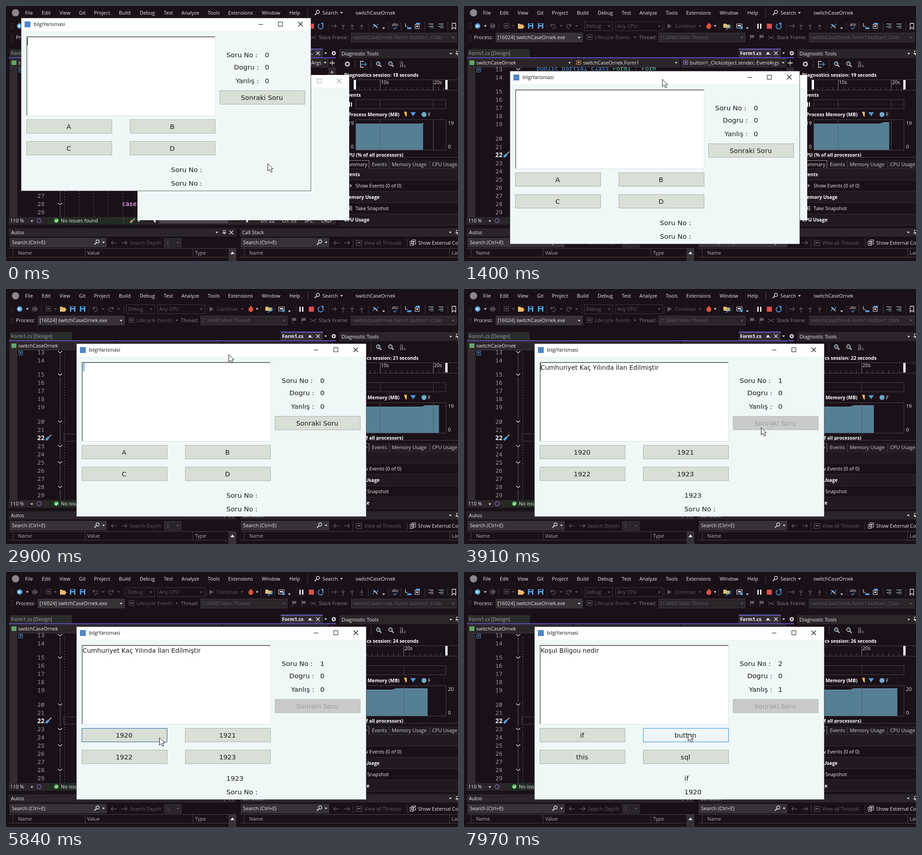
Recreate the animation shown at these times as an HTML page with a canvas. Size 997x562 px, loop 8 s.

```html
<!DOCTYPE html>
<html lang="tr">
<head>
<meta charset="utf-8">
<title>bilgiYarismasi</title>
<style>
html, body { margin: 0; width: 100%; height: 100%; overflow: hidden; background: #1a1018; }
canvas { display: block; }
</style>
</head>
<body>
<canvas id="stage" width="997" height="562"></canvas>
<script>
const c = document.getElementById('stage').getContext('2d');
const LOOP = 8000;
const UI = '"Open Sans", sans-serif', FORM = '"DejaVu Sans", sans-serif', MONO = '"Noto Sans Mono", monospace';
const BG = '#1a1018', BAR = '#2b252a', FIELD = '#383237', EDGE = '#4a444a';
const INK = '#eceaec', DIM = '#625b62', BLUE = '#4a9fe0', MINT = '#eff7f7';

// ---- drawing helpers ----
function rect(x, y, w, h, color) { c.fillStyle = color; c.fillRect(x, y, w, h); }
function box(x, y, w, h, color) {
  c.strokeStyle = color; c.lineWidth = 1;
  c.strokeRect(x + .5, y + .5, w - 1, h - 1);
}
function text(s, x, y, color = INK, size = 10.9, font = UI, weight = 400, align = 'left') {
  c.font = `${weight} ${size}px ${font}`;
  c.fillStyle = color; c.textAlign = align;
  c.fillText(s, x, y + size * .36);
}
const bold = (s, x, y) => text(s, x, y, '#fff', 10.5, UI, 700);
function line(color, width, ...p) {
  c.strokeStyle = color; c.lineWidth = width; c.beginPath();
  for (let i = 0; i < p.length; i += 2) c.lineTo(p[i], p[i + 1]);
  c.stroke();
}
function poly(color, ...p) {
  c.fillStyle = color; c.beginPath();
  for (let i = 0; i < p.length; i += 2) c.lineTo(p[i], p[i + 1]);
  c.fill();
}
function disc(x, y, r, color) { c.fillStyle = color; c.beginPath(); c.arc(x, y, r, 0, 7); c.fill(); }
function ring(x, y, r, color, from = 0, to = 6.3, width = 1.4) {
  c.strokeStyle = color; c.lineWidth = width; c.beginPath(); c.arc(x, y, r, from, to); c.stroke();
}
const drop = (x, y, color = INK) => poly(color, x - 3, y - 1.5, x + 3, y - 1.5, x, y + 2);
const cross = (x, y, r, color) => { line(color, 1.3, x - r, y - r, x + r, y + r); line(color, 1.3, x - r, y + r, x + r, y - r); };
const vline = (x, y0, y1, color = EDGE) => line(color, 1, x + .5, y0, x + .5, y1);
const hline = (y, x0, x1, color = EDGE) => line(color, 1, x0, y + .5, x1, y + .5);
function lens(x, y, dir = 1, color = INK) { ring(x + dir * 2, y - 2, 3.5, color); line(color, 1.8, x - dir, y + 1, x - dir * 5, y + 5); }
function arrow(x, y, dir, color = DIM) {
  line(color, 1.4, x - 6, y, x + 6, y);
  line(color, 1.4, x + dir * 2, y - 4, x + dir * 6, y, x + dir * 2, y + 4);
}
function gear(x, y, r) {
  ring(x, y, r, INK, 0, 6.3, 2);
  for (let a = 0; a < 6; a += Math.PI / 4)
    line(INK, 1.6, x + Math.cos(a) * r, y + Math.sin(a) * r, x + Math.cos(a) * (r + 2), y + Math.sin(a) * (r + 2));
}
function pin(x, y) { box(x - 2, y - 5, 5, 6, INK); hline(y + 1, x - 4, x + 5, INK); vline(x, y + 1, y + 5, INK); }
function grip(x, y) { for (let i = -6; i < 8; i += 4) { rect(x - 2, y + i, 1, 1, '#8a848a'); rect(x + 2, y + i, 1, 1, '#8a848a'); } }
function icon(x, y, color, w = 11, h = 11) { box(x - w / 2 | 0, y - h / 2 | 0, w, h, color); rect((x - w / 2 | 0) + 3, y - 2, w - 6, 3, color); }
function combo(x, y, w, h, s, color, fill = BAR) {
  rect(x, y, w, h, fill); box(x, y, w, h, '#403a40');
  text(s, x + 4, y + h / 2, color); drop(x + w - 8, y + h / 2, color);
}

// ---- timing helpers ----
// last value whose start time has passed
const at = (steps, t) => steps.reduce((v, [start, x]) => t >= start ? x : v, steps[0][1]);
const EDGES = [[0, 920], [330, 925], [700, 930], [1050, 938], [1600, 944], [2100, 949], [2500, 955], [3000, 961],
  [3450, 966], [3730, 904], [4290, 913], [4800, 919], [5300, 924], [5570, 930], [6100, 936], [6450, 942], [6950, 948], [7300, 956]];
const TICKS = [500, 1600, 2500, 3730, 4300, 5300, 6100, 7300];
const PATH = [[0, 577, 347], [60, 577, 347], [520, 369, 44], [600, 369, 44], [840, 416, 141], [900, 422, 150], [1080, 437, 161],
  [1880, 437, 161], [2070, 451, 154], [2480, 488, 140], [2760, 491, 144], [2930, 491, 144], [3480, 655, 305], [4650, 655, 305],
  [5000, 480, 418], [5440, 338, 365], [6430, 338, 365], [7100, 655, 300], [7380, 655, 300], [7900, 494, 356], [8000, 494, 356]];
const CARET_ON = [[0, 120], [600, 1240], [1700, 2230], [3000, 3530], [3730, 4290], [4820, 5350], [7350, 7880]];
const ASK1 = 3730, ANSWER = 5970, ASK2 = 7350;

function pointer(t) {
  const i = PATH.findIndex(p => p[0] > t), [t0, x0, y0] = PATH[i - 1], [t1, x1, y1] = PATH[i];
  let k = (t - t0) / (t1 - t0);
  if (t1 - t0 > 300) k = k * k * (3 - 2 * k);
  return [Math.round(x0 + (x1 - x0) * k), Math.round(y0 + (y1 - y0) * k)];
}

// ---- development environment ----
function toolbars() {
  disc(21, 15, 8, '#8c878d');
  const menu = { File: 42, Edit: 79, View: 118, Git: 161, Project: 194, Build: 249, Debug: 295, Test: 348,
    Analyze: 387, Tools: 445, Extensions: 490, Window: 564, Help: 625, Search: 698, switchCaseOrnek: 771 };
  for (const s in menu) text(s, menu[s], 15);
  vline(665, 5, 25); lens(686, 15); drop(740, 15);

  grip(13, 44); disc(30, 44, 6, BLUE); line('#fff', 1.4, 34, 44, 27, 44); line('#fff', 1.4, 30, 41, 27, 44, 30, 47); drop(47, 44);
  disc(63, 44, 6, '#403a40'); arrow(63, 44, 1);
  icon(94, 44, DIM); drop(109, 44, DIM);
  poly('#e8bd6a', 119, 39, 124, 39, 126, 41, 131, 41, 131, 44, 134, 44, 130, 50, 119, 50);
  for (const x of [147, 169]) { rect(x - 6, 38, 12, 12, BLUE); rect(x - 3, 39, 6, 3, BG); rect(x - 3, 45, 6, 5, BG); }
  for (const x of [77, 183, 260, 442, 562, 592, 640, 711, 799]) vline(x, 35, 54, '#352e35');
  for (const [x, d] of [[197, -1], [231, 1]]) {
    ring(x, 45, 4.5, DIM, d < 0 ? -2.8 : 1, d < 0 ? 2 : 6); line(DIM, 1.4, x + d * 5, 39, x + d * 5, 44, x + d, 44); drop(x + 17, 44, DIM);
  }
  combo(265, 34, 63, 21, 'Debug', DIM, BG); combo(334, 34, 105, 21, 'Any CPU', DIM, BG);
  poly(DIM, 449, 39, 458, 44, 449, 50); text('Continue', 465, 44, DIM); drop(521, 44, DIM);
  poly('#e2543c', 540, 37, 545, 42, 545, 48, 540, 51, 535, 48, 535, 43); drop(554, 44);
  poly('#e8bd6a', 572, 39, 578, 39, 580, 41, 586, 41, 586, 48, 572, 48); lens(583, 47, 1, BLUE);
  icon(608, 44, INK, 13, 10); disc(612, 48, 3, BLUE); drop(625, 49);
  rect(647, 39, 3, 11, INK); rect(653, 39, 3, 11, INK); rect(668, 39, 11, 11, '#e04f4f');
  ring(694, 45, 5.5, BLUE, -.8, 4.4, 1.8); poly(BLUE, 694, 37, 700, 37, 700, 43);
  arrow(723, 44, 1);
  for (const [x, d] of [[743, 1], [763, 1], [784, -1]]) { vline(x, 38, 47, DIM); line(DIM, 1.4, x - 3, 44 - d * 2, x + .5, 44 + d * 2, x + 4, 44 - d * 2); disc(x + .5, 50, 1.5, DIM); }
  line(BLUE, 1.4, 809, 49, 814, 41, 817, 46, 821, 39); line(INK, 1.2, 810, 40, 820, 49); drop(833, 49); grip(844, 44);
  text('abc', 851, 41, INK, 9); line(BLUE, 1.3, 854, 48, 857, 51, 862, 46);
  line(INK, 1.2, 881, 38, 881, 45, 886, 45); rect(885, 47, 9, 4, BLUE);
  icon(907, 45, INK, 10, 10); rect(904, 37, 9, 3, BLUE);
  for (const x of [937, 959]) for (let i = 0; i < 4; i++) hline(39 + i * 3, x - 5 + i % 2 * 4, x + 6, i % 2 ? '#5fb878' : INK);
  vline(871, 35, 54); vline(924, 35, 54); vline(974, 35, 54);
  line(INK, 1.3, 984, 38, 992, 38, 992, 51, 988, 47, 984, 51, 984, 38);

  grip(13, 69); text('Process:', 22, 69); combo(70, 59, 192, 21, '[16024] switchCaseOrnek.exe', INK, FIELD);
  icon(277, 69, DIM, 12); text('Lifecycle Events', 288, 69, DIM); drop(377, 69, DIM); text('Thread:', 386, 69, '#8a848a');
  combo(429, 59, 192, 21, '[12848] Main Thread', DIM, BAR);
  for (const x of [631, 652]) { vline(x, 63, 76, DIM); rect(x, 64, 9, 6, DIM); }
  line(DIM, 1.3, 671, 66, 684, 73); line(DIM, 1.3, 671, 73, 684, 66);
  text('Stack Frame:', 690, 69, '#8a848a'); combo(761, 59, 233, 21, 'switchCaseOrnek.Form1.button1_Click', DIM, BAR);
}

function editor() {
  rect(8, 95, 137, 18, '#2a2c2c'); text('Form1.cs [Design]', 11, 104, '#aaa6aa');
  rect(606, 95, 93, 18, '#332d38'); rect(606, 94, 93, 2, '#6f63d0'); bold('Form1.cs', 609, 104);
  rect(668, 102, 5, 4, INK); hline(106, 666, 677, INK); cross(688, 104, 4, INK); drop(705, 104); gear(723, 104, 3);
  rect(6, 113, 722, 2, '#6054b8');
  for (const [x, s, color] of [[8, 'switchCaseOrnek', '#5fa968'], [243, 'switchCaseOrnek.Form1', '#d9a35c'], [479, 'button1_Click(object sender, EventArgs', '#a98be0']]) {
    rect(x, 116, 232, 19, BAR); box(x, 116, 232, 19, '#403a40');
    if (x === 8) rect(12, 120, 11, 10, color); else { icon(x + 10, 125, color, 10, 9); }
    text(s, x === 8 ? 27 : x + 19.5, 125); rect(x + 219, 117, 12, 17, BAR); drop(x + 225, 125);
  }
  vline(719, 119, 132, INK); hline(124, 714, 725, INK); hline(126, 714, 725, INK);

  c.save(); c.beginPath(); c.rect(0, 135, 728, 330); c.clip();
  rect(8, 135, 17, 330, '#312b30'); rect(711, 135, 17, 330, '#312b30'); poly('#9a949a', 715, 148, 723, 148, 719, 142);
  icon(33, 141, BLUE, 9, 10);
  vline(119, 135, 465, '#69636a');
  c.setLineDash([3, 3]);
  for (let x = 129; x < 260; x += 32) vline(x, 143, 465, '#655f66');
  c.setLineDash([]);
  box(127, 319, 584, 17, '#48424a');
  let y = 139;
  for (let n = 13; n < 30; n++) {
    text(n, 85, y, n === 22 ? '#fff' : '#9d979d', 13.3, MONO, n === 22 ? 700 : 400, 'right');
    if ([13, 15, 20, 23, 25, 28].includes(n)) { rect(114, y - 5, 11, 10, BG); line(INK, 1.3, 115, y - 2, 119.5, y + 2, 124, y - 2); }
    if (n === 14 || n === 19) y += 13.5;
    y += 18;
  }
  text('public partial', 160, 137, BLUE, 13.3, MONO); text('class', 280, 137, BLUE, 13.3, MONO); text('Form1 : Form', 328, 137, '#4ec9b0', 13.3, MONO);
  text('case', 256, 436, '#c98add', 13.3, MONO, 700);
  line(BLUE, 5, 88, 333, 94, 327); line(INK, 1.5, 94, 327, 100, 321);
  c.restore();

  rect(6, 465, 722, 17, BAR); rect(92, 465, 200, 17, '#232b24');
  text('110 %', 9, 473.5); drop(57, 474); ring(73, 473, 4.5, '#7a70b8');
  disc(111, 473, 5, '#4fb862'); line('#fff', 1.3, 108.5, 473, 110.5, 475.5, 114, 471); text('No issues found', 121, 473.5);
  vline(259, 467, 480); line('#d99a62', 4, 274, 477, 279, 473); line(INK, 1.3, 279, 473, 284, 468); drop(293, 474);
  poly(INK, 330, 470, 330, 478, 325, 474); rect(338, 468, 152, 11, '#4c464c'); poly(INK, 530, 470, 530, 478, 535, 474);
  text('Ln: 22', 562, 473.5); text('Ch: 53', 609, 473.5); text('SPC', 658, 473.5); text('CRLF', 695, 473.5);
}

function panels() {
  for (const [x, w, title, searchW] of [[6, 502, 'Autos', 214], [516, 481, 'Call Stack', 195]]) {
    rect(x, 490, w, 18, BAR); text(title, x + 5, 499);
    rect(x + 2, 511, searchW, 21, FIELD); text('Search (Ctrl+E)', x + 7, 521.5);
    lens(x + searchW - 20, 521, 1); drop(x + searchW - 5, 521);
    arrow(x + searchW + 18, 522, -1); arrow(x + searchW + 41, 522, 1);
    rect(x, 534, w, 1, EDGE); rect(x, 553, w, 1, EDGE); vline(x + 9, 535, 553);
    text('Name', x + 20.5, 544, '#b5b0b5');
  }
  drop(465, 499); pin(481, 499); cross(497, 499, 4, INK); drop(980, 499); pin(995, 499);
  text('Search Depth:', 273, 522, DIM); combo(349, 512, 38, 20, '3', DIM);
  vline(174, 535, 553); vline(412, 535, 553); text('Value', 179, 544, '#b5b0b5'); text('Type', 417, 544, '#b5b0b5');
  rect(491, 535, 17, 27, FIELD); poly(INK, 495, 547, 504, 547, 499.5, 541);
  vline(765, 513, 531); icon(779, 522, DIM, 13, 12); text('View all Threads', 790, 522, DIM);
  vline(884, 513, 531); icon(895, 523, INK, 8, 10); icon(900, 520, INK, 9, 10); text('Show External Code', 909, 522);
  vline(978, 535, 553); text('Lan', 983, 544, '#b5b0b5');
}

function diagnostics(t) {
  const shift = t < 3730 ? 0 : 65, edge = at(EDGES, t), seconds = 18 + TICKS.filter(x => t >= x).length;
  rect(735, 95, 262, 20, BAR); text('Diagnostic Tools', 740, 105); drop(981, 105); pin(995, 104);
  gear(753, 128, 4); vline(770, 119, 138); vline(805, 119, 138);
  line(INK, 1.3, 789, 122, 782, 122, 782, 135, 789, 135); arrow(789, 128.5, 1, BLUE);
  for (const x of [821, 848]) { ring(x, 127, 4, INK); line(INK, 1.8, x + 3, 130, x + 7, 134); hline(126, x - 2, x + 3, BLUE); }
  vline(821, 125, 130, BLUE);
  rect(869, 129, 3, 6, DIM); rect(873, 125, 3, 10, DIM); rect(878, 130, 3, 5, DIM); ring(872, 125, 2.5, DIM);
  bold(`Diagnostics session: ${seconds} seconds`, 746, 152.5);

  hline(162, 735, 997); hline(185, 735, 997);
  for (let k = -6; k < 20; k++) {
    const x = Math.round(825 - shift + k * 11.7);
    if (x > 771 && x < 969) vline(x, k % 10 ? 179 : 163, 185, k % 10 ? '#59535a' : '#8a848a');
  }
  if (!shift) text('10s', 827, 168.5);
  text('20s', 944 - shift, 168.5);
  rect(767, 163, 5, 21, '#fff'); rect(969, 163, 5, 21, '#fff');
  bold('Events', 748, 196); rect(757, 212, 2, 10, INK); rect(761, 212, 2, 10, INK);
  box(771, 206, 200, 21, EDGE); hline(216, 772, 970, '#2c252c');
  bold('Process Memory (MB)', 755, 239);
  poly('#f0bd4c', 878, 233, 884, 233, 884, 244, 881, 242); poly(BLUE, 892, 234, 904, 234, 898, 243); disc(922, 239, 5.5, '#6fa9c8');
  c.save(); c.beginPath(); c.rect(930, 230, 6, 18); c.clip(); text('P', 931, 239); c.restore();
  const step = 917 - shift, top = x => x < step ? 260 : 257;
  poly('#557f94', 772, 317, 772, 260, Math.min(step, edge), 260, Math.min(step + 8, edge), top(edge), edge, top(edge), edge, 317);
  line('#7fb0c8', 1, 772, 260, Math.min(step, edge), 260, Math.min(step + 8, edge), top(edge), edge, top(edge));
  for (const x of [825, 942]) if (x - shift > 771) { vline(x - shift, 207, 226); vline(x - shift, 252, 317, '#55606a'); }
  box(771, 250, 200, 68, EDGE);
  const peak = t < 5570 ? '19' : '20';
  for (const [s, y] of [[peak, 258], ['0', 310]]) { text(s, 767, y, INK, 10.9, UI, 400, 'right'); text(s, 975, y); }
  c.save(); c.beginPath(); c.rect(735, 320, 262, 13); c.clip(); bold('CPU (% of all processors)', 748, 328); c.restore();

  rect(735, 333, 262, 1, EDGE); rect(735, 340, 262, 18, '#231b22');
  rect(738, 340, 62, 19, BG); box(738, 340, 63, 19, '#9a949a');
  text('Summary', 748, 349); text('Events', 807, 349, '#cfcacf'); text('Memory Usage', 851, 349, '#cfcacf'); text('CPU Usage', 940, 349, '#cfcacf');
  vline(845, 341, 358); vline(934, 341, 358); hline(358, 800, 997);
  for (const [s, y] of [['Events', 371], ['Memory Usage', 421], ['CPU Usage', 471]]) {
    rect(735, y - 12, 262, 24, '#211820'); bold(s, 746, y); hline(y + 12, 735, 997, '#352e35'); hline(y - 13, 735, 997, '#352e35');
  }
  text('Show Events (0 of 0)', 771, 396); line(INK, 1.3, 758, 393, 762, 396, 758, 399);
  text('Take Snapshot', 771, 446); icon(758, 446, INK, 11, 9);
}

// ---- quiz window ----
function windowButtons(x, y, color) {
  box(x - 49, y - 5, 10, 10, color);
  cross(x, y, 5, color);
}

function quiz(X, Y, t, [px, py], dragging) {
  const phase = t < ASK1 ? 0 : t < ASK2 ? 1 : 2;
  const options = [['A', 'B', 'C', 'D'], ['1920', '1921', '1922', '1923'], ['if', 'button', 'this', 'sql']][phase];
  const locked = phase === 2 || phase === 1 && t < ANSWER;
  const label = (s, x, y, align) => text(s, X + x, Y + y, '#1c1c1c', 14.9, FORM, 400, align);

  rect(X, Y, 640, 382, MINT); rect(X, Y, 640, 29, '#fff'); box(X, Y, 640, 382, '#5c5f60');
  rect(X + 8, Y + 8, 13, 13, '#4f86c6'); text('bilgiYarismasi', X + 28, Y + 14.5, '#111');
  hline(Y + 14, X + 524, X + 534, '#111'); windowButtons(X + 616.5, Y + 14, '#111');

  rect(X + 12, Y + 41, 417, 175, '#fff');
  rect(X + 12, Y + 41, 417, 2, '#6f7272'); rect(X + 12, Y + 41, 2, 175, '#7d8080'); rect(X + 12, Y + 215, 417, 1, '#dfe3e3'); rect(X + 428, Y + 41, 1, 175, '#dfe3e3');
  text(['', 'Cumhuriyet Kaç Yılında İlan Edilmiştir', 'Koşul Biligou nedir'][phase], X + 14, Y + 52.5, '#1c1c1c', 13.9, FORM);
  if (CARET_ON.some(([a, b]) => t >= a && t < b)) rect(X + 14, Y + 44, 1, 17, '#111');
  if (t >= 2900 && t < 3000) rect(X + 14, Y + 43, 5, 18, '#a6c9e6');

  function button(s, x, y, off, pressed, focused) {
    const bx = X + x, by = Y + y;
    const over = !off && !dragging && px >= bx && px < bx + 189 && py >= by && py < by + 31;
    rect(bx, by, 189, 31, off ? '#c9caca' : over && !pressed ? '#edf5f9' : '#d8dfd6');
    box(bx, by, 189, 31, off ? '#bcbebe' : pressed || focused ? '#1c66ad' : over ? '#2f8ad6' : '#aab0aa');
    text(s, bx + 93.5, by + 16, off ? '#9b9c9c' : '#1c1c1c', 14.6, FORM, 400, 'center');
  }
  options.forEach((s, i) => button(s, 12 + i % 2 * 228.5 | 0, 224 + (i >> 1) * 48, false,
    !i && t >= 5800 && t < ANSWER, !i && t >= ANSWER && t < ASK2));
  button('Sonraki Soru', 438, 160, locked, t > 3650 && t < ASK1);

  label('Soru No :', 453, 82); label(phase, 538, 82);
  label('Dogru :', 525, 109, 'right'); label('0', 538, 109);
  label('Yanlış :', 525, 139, 'right'); label(t < ANSWER ? 0 : 1, 538, 139);
  label(['Soru No :', '1923', 'if'][phase], 331, 335);
  label(t < ANSWER ? 'Soru No :' : '1920', 331, 365);
}

function backWindow() {
  rect(290, 152, 467, 320, MINT); rect(290, 152, 467, 28, '#fff');
  windowButtons(735, 165, '#a0a0a0');
}

function outline(x, y) {
  c.globalCompositeOperation = 'difference';
  c.strokeStyle = '#e8ece8'; c.lineWidth = 4;
  c.strokeRect(x + 2, y + 2, 636, 378);
  c.globalCompositeOperation = 'source-over';
}

function arrowCursor(x, y) {
  c.beginPath();
  [[0, 0], [0, 16], [4, 12.5], [6.5, 18.5], [9.5, 17.5], [7, 11.5], [11.5, 11.5]].forEach(([a, b]) => c.lineTo(x + a + .5, y + b + .5));
  c.closePath();
  c.fillStyle = '#fff'; c.fill();
  c.strokeStyle = '#111'; c.lineWidth = 1; c.stroke();
}

function draw(t) {
  const tip = pointer(t), first = t >= 600 && t < 1240, second = t >= 1880 && t < 2900;
  const [X, Y] = at([[0, [33, 26]], [1240, [101, 143]], [2900, [155, 120]]], t);
  rect(0, 0, 997, 562, BG);
  toolbars(); editor(); panels(); diagnostics(t);
  backWindow();
  quiz(X, Y, t, tip, first || second);
  const [gx, gy] = first ? [369, 44] : [437, 161];
  if ((first || second) && (tip[0] !== gx || tip[1] !== gy)) outline(X + tip[0] - gx, Y + tip[1] - gy);
  arrowCursor(...tip);
}

const start = performance.now();
function frame() {
  draw((performance.now() - start) % LOOP);
  requestAnimationFrame(frame);
}
frame();
</script>
</body>
</html>
```
